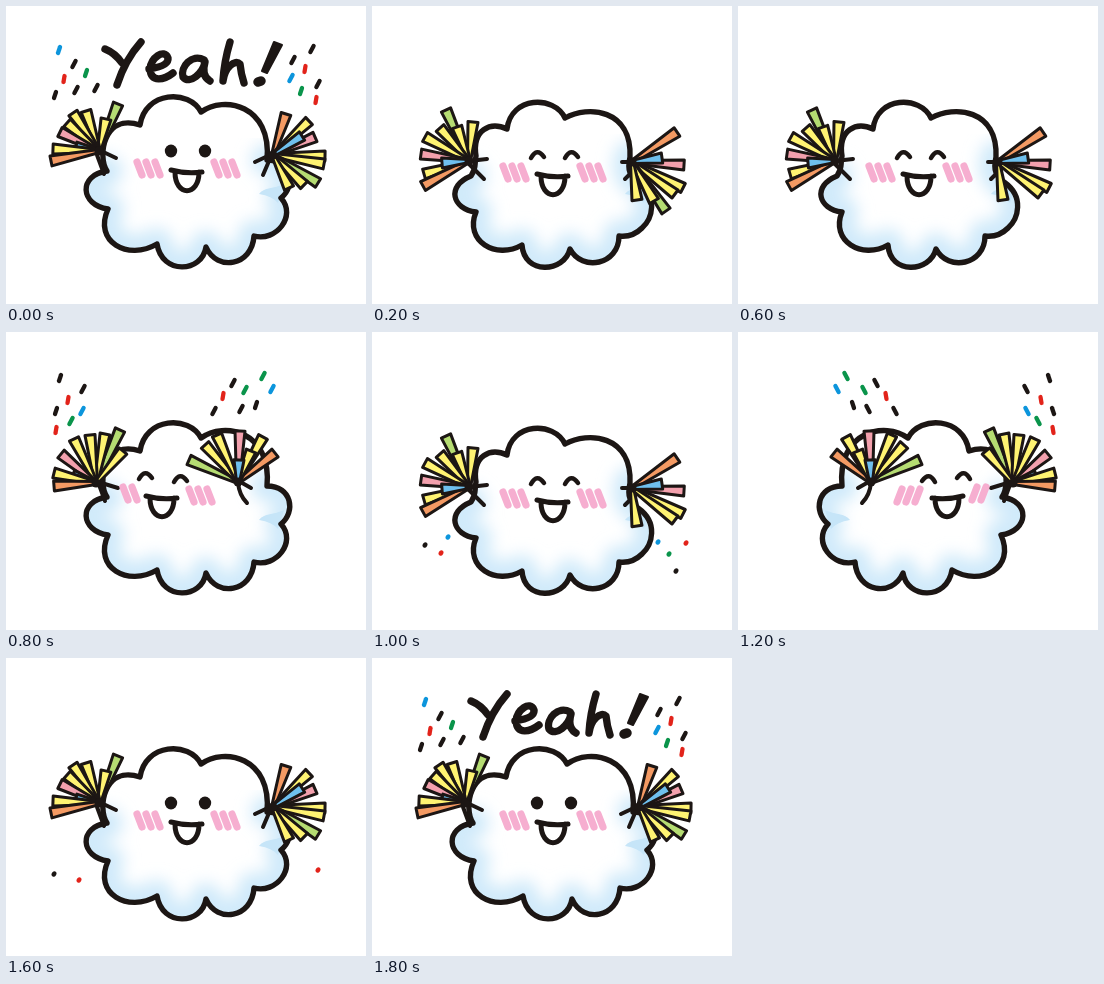
Animation of 360x298 px, one loop 2000 ms. Source, as an HTML page:

```html
<!DOCTYPE html>
<html lang="en">
<head>
<meta charset="utf-8">
<title>Cheering cloud</title>
<style>
html, body { margin: 0; width: 100%; height: 100%; overflow: hidden; background: #fff; }
svg { display: block; width: 100vw; height: 100vh; }
</style>
</head>
<body>
<svg id="stage" viewBox="0 0 360 298" fill="none" stroke-linecap="round" stroke-linejoin="round"></svg>
<script>
const INK = '#1c1614';
const COLORS = { y: '#fff372', o: '#f49a63', g: '#b5dc72', b: '#6fc0ee', p: '#f3a0ad',
  k: INK, r: '#e2231a', B: '#0c95dc', G: '#0a944b' };

const stroke = (d, width, color = INK, extra = '') =>
  `<path d="${d}" stroke="${color}" stroke-width="${width}" ${extra}/>`;

// "x,y,c x,y,c" -> [[x, y, c], ...]
const parse = list => list.split(' ').map(item => {
  const [x, y, c] = item.split(',');
  return [+x, +y, c];
});

// Streamers widen from the hub to each listed tip.
function pom(hx, hy, tips) {
  return parse(tips).map(([x, y, c]) => {
    const len = Math.hypot(x - hx, y - hy);
    const nx = -(y - hy) / len, ny = (x - hx) / len;
    const at = (px, py, w) => `${(px + nx * w).toFixed(1)} ${(py + ny * w).toFixed(1)}`;
    return stroke(`M${at(hx, hy, 1.5)}L${at(x, y, 5)}L${at(x, y, -5)}L${at(hx, hy, -1.5)}Z`,
      3, INK, `fill="${COLORS[c]}"`);
  }).join('') + `<circle cx="${hx}" cy="${hy}" r="4.5" fill="${INK}"/>`;
}

// Paper bits lean alternately around the upright.
const confetti = list => parse(list).map(([x, y, c], i) => {
  const dx = c === 'r' ? .5 : i % 3 ? 1.6 : 1;
  return stroke(`M${x + dx} ${y - 3}L${x - dx} ${y + 3}`, 4.3, COLORS[c]);
}).join('');

const dots = list => parse(list).map(([x, y, c]) =>
  `<ellipse cx="${x}" cy="${y}" rx="2.3" ry="2.8" fill="${COLORS[c]}" transform="rotate(30 ${x} ${y})"/>`).join('');

// The shaded lower edge runs from the join to the end of the outline.
function cloud(top, join, bottom) {
  const outline = `${top} ${join}${bottom}Z`;
  return `<clipPath id="body"><path d="${outline}"/></clipPath>
    <filter id="soft" x="-20%" y="-20%" width="140%" height="140%"><feGaussianBlur stdDeviation="8"/></filter>
    <path d="${outline}" fill="#fff"/>
    <g clip-path="url(#body)">
      ${stroke(`M${join}${bottom}`, 32, '#d0eafa', 'filter="url(#soft)"')}
      <path d="M278 178C268 183 258 181 253 188Q266 190 272 197Z" fill="#c6e5f8"/>
    </g>
    ${stroke(outline, 5.4)}`;
}

const tallCloud = () => cloud(
  'M101 165C91 150 98 107 134 119C139 85 183 83 195 106C218 89 266 99', '261 154',
  'C286 154 290 180 275 192C291 210 270 236 248 230C246 260 211 266 200 241C196 267 156 269 151 238C122 255 87 236 102 203C74 199 72 169 101 165');
const wideCloud = () => cloud(
  'M99 170C105 161 102 160 104 150C100 124 118 115 135 123C139 90 182 89 193 112C216 99 260 103', '258 151',
  'C255 164 258 170 266 176C287 191 280 213 270 222C263 229 255 231 247 230C247 259 210 266 198 243C192 267 152 269 150 239C124 254 92 235 104 206C80 203 74 180 99 170');

const cheek = (x, y, count = 3) => Array.from({ length: count }, (_, i) =>
  stroke(`M${x + i * 9} ${y}l5 13`, 7.2, '#f6aed0')).join('');
const mouth = (x, y) => stroke(`M${x} ${y}q15 4 31 2M${x + 4} ${y + 2}c0 25 24 25 24 0`, 5, INK, 'fill="#fff"');
const smileEye = (x, y) => stroke(`M${x} ${y}q6 -11 13 -1`, 4.5);
const openEye = x => `<ellipse cx="${x}" cy="145" rx="6.2" ry="6.4" fill="${INK}"/>`;

const raised = () => tallCloud()
  + stroke('M91 143L110 152M91 149L98 168M266 148L249 156M266 148L257 169', 4)
  + pom(93, 145, '112,98,g 100,113,y 80,105,y 67,107,y 61,117,y 54,126,p 70,141,b 47,143,y 45,155,o')
  + pom(267, 149, '280,108,o 303,115,y 309,131,p 319,150,y 318,158,y 312,177,g 298,179,y 283,182,y 296,130,b')
  + cheek(131, 156) + cheek(208, 156) + openEye(165) + openEye(199) + mouth(165, 164);

const spread = tail => wideCloud()
  + stroke('M97 155L115 153M97 158L112 173M250 156L268 156M253 173L266 160', 4)
  + pom(97, 155, '74,104,g 101,116,y 85,121,y 68,122,y 53,131,y 49,148,p 52,168,y 51,180,o 70,157,b')
  + pom(260, 156, `305,126,o 312,159,p 311,182,y 303,188,y ${tail ? '294,205,g 282,195,y ' : ''}265,194,y 290,152,b`)
  + cheek(131, 160) + cheek(208, 160) + smileEye(159, 152) + smileEye(193, 152) + mouth(165, 168);

const swing = () => tallCloud()
  + stroke('M89 149L112 156M92 150L99 169M232 150Q233 163 241 171M231 148L245 156', 4)
  + pom(90, 151, '114,98,g 99,102,y 84,103,y 68,107,y 117,119,y 55,122,p 67,143,b 48,141,y 48,154,o')
  + pom(232, 150, '183,128,g 199,113,y 211,103,y 234,99,p 257,105,y 269,121,o 245,119,y 233,128,b')
  + cheek(117, 155, 2) + cheek(183, 157) + smileEye(133, 147) + smileEye(168, 150) + mouth(140, 164)
  + confetti('54,46,k 77,57,k 62,68,r 50,79,k 76,79,B 65,89,G 50,98,r 227,51,k 257,44,G 217,64,r 239,58,G 266,57,B 250,73,k 235,77,k 208,79,k');

const cheer = () => raised()
  + '<g role="img" aria-label="Yeah!">'
  + stroke('M99 43Q109 47 116 57M135 36Q119 54 111 79'
    + 'M143 63Q163 60 162 52C158 42 145 52 144 63C145 77 158 74 167 67'
    + 'M198 54C186 47 174 61 177 71C184 79 197 67 199 56Q195 70 204 75'
    + 'M224 36Q218 56 217 75C219 61 229 53 234 58Q235 68 238 77', 7.4)
  + `<path d="M268 36L276 39L261 67L256 65Z" fill="${INK}" stroke="${INK}" stroke-width="2"/>`
  + stroke('M252 76l3 -1', 9.5) + '</g>'
  + confetti('53,44,B 68,58,k 58,73,r 80,67,G 70,84,k 90,82,k 49,89,k 306,43,k 287,54,k 299,63,r 285,72,B 312,78,k 295,85,G 310,94,r');

const scenes = [
  cheer,
  () => spread(true),
  raised,
  () => spread(false),
  swing,
  () => spread(false) + dots('53,213,k 76,205,B 69,221,r 286,210,B 314,211,r 297,222,G 304,239,k'),
  () => `<g transform="matrix(-1 0 0 1 365 0)">${swing()}</g>`,
  () => spread(false) + dots('53,215,k 73,222,r 65,236,B 292,206,B 314,211,r 301,225,k 286,236,G'),
  () => raised() + dots('48,216,k 73,222,r 312,212,r'),
  cheer
];

const stage = document.getElementById('stage');
let shown = -1;
function tick(now) {
  const step = Math.floor(now / 200) % scenes.length;
  if (step !== shown) stage.innerHTML = scenes[shown = step]();
  requestAnimationFrame(tick);
}
tick(performance.now());
</script>
</body>
</html>
```
